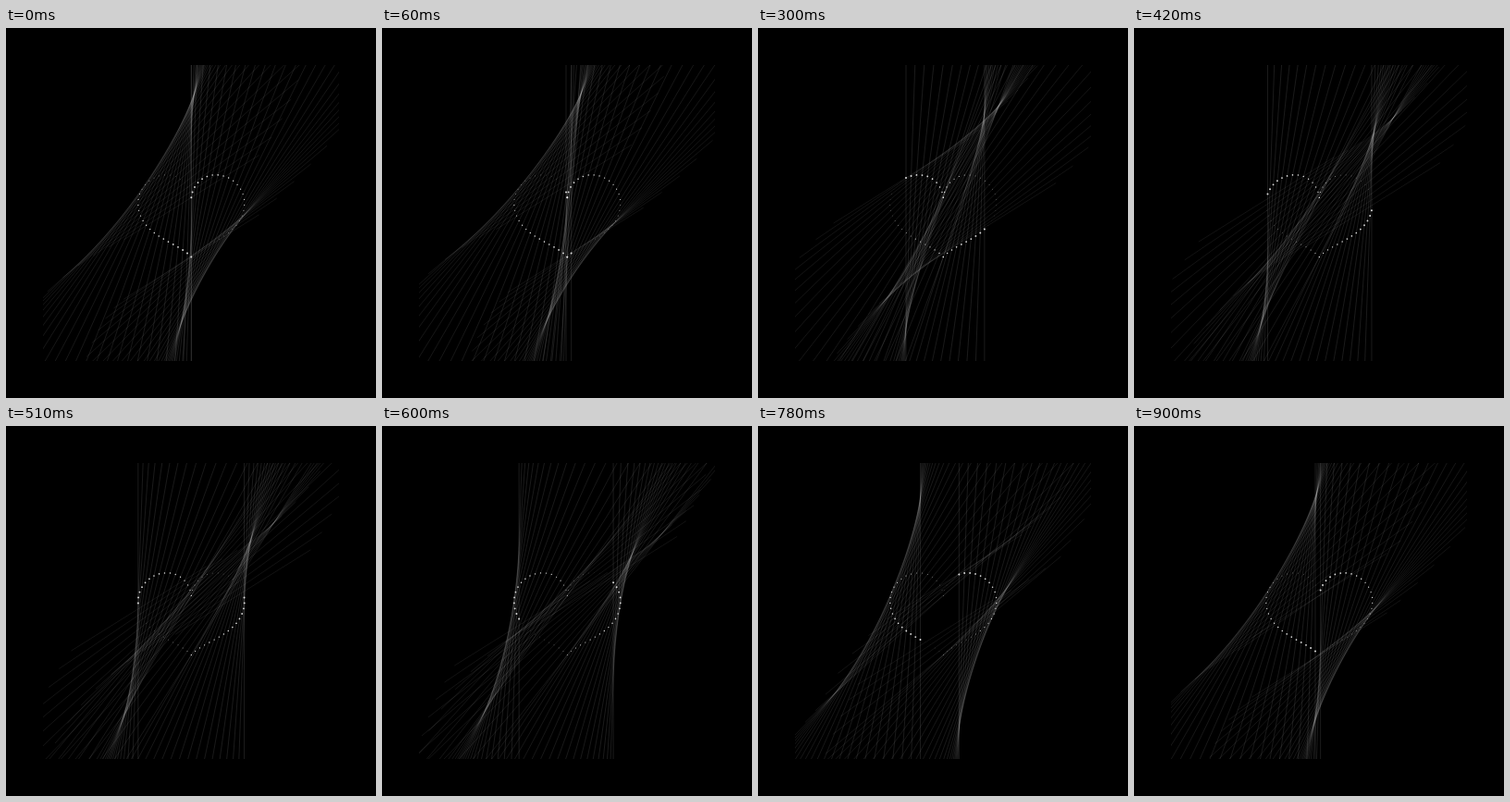
An HTML page with a canvas that plays this animation: 400 by 400 pixels, repeating every 930 ms.

```html
<!DOCTYPE html>
<html lang="en">
<head>
<meta charset="utf-8">
<title>Heart of lines</title>
<style>
html, body { margin: 0; width: 100%; height: 100%; overflow: hidden; background: #000; }
canvas { display: block; width: 400px; height: 400px; }
</style>
</head>
<body>
<canvas id="stage" width="400" height="400"></canvas>
<script>
const ctx = document.getElementById('stage').getContext('2d');
const HALF = 30;          // points on each half of the heart
const STEP = 30;          // ms
const STEPS = 31;
const HOLD = 16;          // this step is shown twice
const REACH = 664;        // half length of a fresh line
const TURN = Math.PI / 90;

// Right half of the heart, from the notch to the tip, centred on x = 0.
const curve = document.createElementNS('http://www.w3.org/2000/svg', 'path');
curve.setAttribute('d', 'M0 183C2 168 13 158.5 26.5 158.5C44 158.5 57.5 173 57.5 189' +
  'C57.5 204 49 215.5 36 224C23 233 8 238 0 247.3');
const total = curve.getTotalLength();
const side = Array.from({ length: HALF }, (_, i) => {
  const p = curve.getPointAtLength(total * i / (HALF - 1));
  return [p.x, p.y];
});

// Whole outline: down the left half, then up the right half.
const heart = [
  ...side.map(([x, y]) => [200.3 - x, y + 0.3]),
  ...side.map(([x, y]) => [200.3 + x, y + 0.3]).reverse()
];

function drawMark([x, y], age) {
  const size = 1 - 0.9 * age / HALF;
  const dx = Math.sin(age * TURN) * REACH * size;
  const dy = -Math.cos(age * TURN) * REACH * size;
  ctx.globalAlpha = 0.16 * (0.6 + 0.4 * size);
  ctx.beginPath();
  ctx.moveTo(x - dx, y - dy);
  ctx.lineTo(x + dx, y + dy);
  ctx.stroke();
  ctx.globalAlpha = 0.85;
  ctx.beginPath();
  ctx.arc(x, y, size, 0, 2 * Math.PI);
  ctx.fill();
}

function draw(step) {
  const head = HALF - 1 + (step > HOLD ? step - 1 : step);
  ctx.globalAlpha = 1;
  ctx.fillStyle = '#000';
  ctx.fillRect(0, 0, 400, 400);
  ctx.save();
  ctx.beginPath();
  ctx.rect(40, 40, 320, 320);
  ctx.clip();
  ctx.fillStyle = ctx.strokeStyle = '#fff';
  ctx.lineWidth = 0.7;
  for (let age = HALF - 1; age >= 0; age--) {
    drawMark(heart[(head - age) % (2 * HALF)], age);
    drawMark(heart[(head - age + HALF) % (2 * HALF)], age);
  }
  ctx.restore();
}

const start = performance.now();
function tick() {
  const time = Math.max(0, performance.now() - start);
  draw(Math.floor(time / STEP) % STEPS);
  requestAnimationFrame(tick);
}
tick();
</script>
</body>
</html>
```
